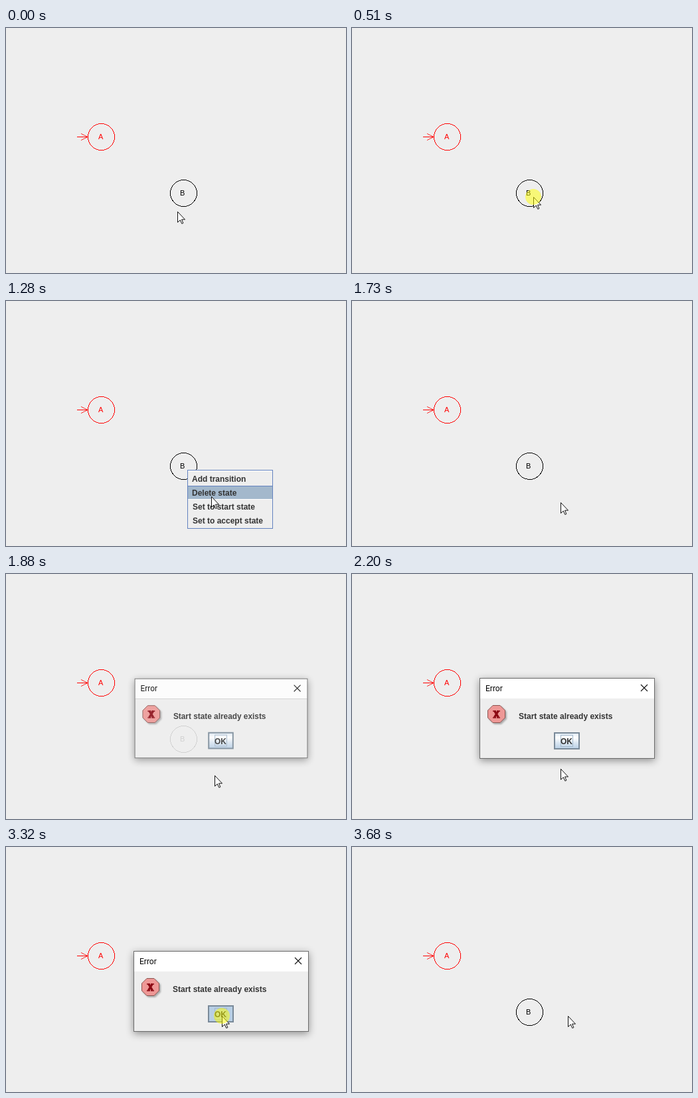
Recreate the animation shown at these times as an HTML page. Size 512 by 370 pixels, loop 3.75 s.

```html
<!DOCTYPE html>
<html lang="en">
<head>
<meta charset="utf-8">
<title>State diagram editor</title>
<style>
  html, body { margin: 0; width: 100%; height: 100%; overflow: hidden; background: #eee; }
  svg { display: block; }
  text { font: 11px "Liberation Sans", Arial, sans-serif; }
  .bold text { font-weight: bold; font-size: 12px; fill: #333; }
  .bold .title { font: 12px Roboto, "Open Sans", sans-serif; fill: #000; }
  .crisp { shape-rendering: crispEdges; }
  .frame { filter: drop-shadow(0 3px 6px rgba(0, 0, 0, .4)); }
  #dialog { transform-origin: 324px 218px; }
</style>
</head>
<body>
<svg width="512" height="370">
  <defs>
    <linearGradient id="metal" x2="0" y2="1">
      <stop stop-color="#dde8f3"/>
      <stop offset=".3" stop-color="#fff"/>
      <stop offset=".6" stop-color="#dde8f3"/>
      <stop offset="1" stop-color="#b8cfe5"/>
    </linearGradient>
  </defs>

  <g class="crisp" fill="none" stroke="red">
    <circle cx="143.5" cy="164.5" r="20"/>
    <path d="M107 164.5H123"/>
    <path d="M113 159.5L123.5 164.5L113 169.5" stroke-width=".8"/>
  </g>
  <text x="139" y="168" fill="red">A</text>
  <circle class="crisp" cx="267.5" cy="249.5" r="20" fill="none" stroke="#000"/>
  <text x="262" y="253">B</text>

  <g id="menu" class="bold">
    <rect x="273.5" y="255.5" width="128" height="88" fill="#eee" stroke="#6382bf"/>
    <path d="M274 256.5H401" stroke="#fff"/>
    <g id="armed">
      <rect x="274" width="127" height="21" fill="#a3b8cc"/>
      <path d="M274 .5H401" stroke="#6382bf"/>
      <path d="M274 20.5H401" stroke="#fff"/>
    </g>
    <text x="280" y="273">Add transition</text>
    <text x="280" y="294">Delete state</text>
    <text x="281" y="315">Set to start state</text>
    <text x="281" y="336">Set to accept state</text>
  </g>

  <g id="dialog" class="bold">
    <rect class="frame" x="192" y="157" width="264" height="122" fill="#6b6b6b"/>
    <rect x="193" y="158" width="262" height="30" fill="#fff"/>
    <rect x="193" y="188" width="262" height="90" fill="#eee"/>
    <text class="title" x="201" y="177">Error</text>
    <path d="M435 167l10 10m0-10l-10 10" stroke="#111" stroke-width="1.1"/>
    <g transform="translate(217.5 211.5)">
      <path id="stop" d="M-5.5-13h11l7.500 7.500v11l-7.500 7.500h-11l-7.500-7.500v-11z" fill="#ee9896" stroke="#8a5450"/>
      <path d="M-3-5l6 10m0-10l-6 10" stroke="#8c0a14" stroke-width="3.4"/>
      <path d="M-5.500-4.500h11m-11 10h11" stroke="#8c0a14" stroke-width="1.6" stroke-dasharray="5 1"/>
    </g>
    <text x="251" y="219">Start state already exists</text>
    <rect id="button" x="305" y="240" width="37" height="24" stroke="#7a8a99" stroke-width="2"/>
    <rect x="314.5" y="243.5" width="18" height="17" fill="none" stroke="#a3b8cc"/>
    <text x="314" y="257">OK</text>
  </g>

  <g id="pointer">
    <path d="M.5 .5v16l3.800-3.500 2.500 5.500 2.100-.9-2.400-5.400h5z"
          fill="#fff" stroke="#111" stroke-linejoin="round"/>
    <circle id="click" r="12" fill="#ff0" opacity=".5"/>
  </g>
</svg>
<style>#stop { filter: drop-shadow(2px 2px 1px #aaa); }</style>
<script>
const LOOP = 3750;
const [menu, armed, dialog, button, pointer, click] =
  ["menu", "armed", "dialog", "button", "pointer", "click"].map(id => document.getElementById(id));

// pointer moves: start, end, x, y reached; equal times make a jump
const home = [258, 277];
const moves = [
  [30, 110, 255, 271], [110, 260, 273, 255],
  [1020, 1020, 277, 258], [1020, 1280, 309, 295], [1280, 1420, 314, 304],
  [2200, 2200, 314, 294], [2200, 2300, 314, 289],
  [2450, 3010, 325, 255]
];

const clamp = v => Math.min(1, Math.max(0, v));
const within = (t, from, to) => t >= from && t < to;
const show = (node, on) => node.setAttribute("visibility", on ? "inherit" : "hidden");

function tipAt(t) {
  let [x, y] = home;
  for (const [from, to, toX, toY] of moves) {
    if (t < from) break;
    const p = to > from ? clamp((t - from) / (to - from)) : 1;
    x += (toX - x) * p;
    y += (toY - y) * p;
  }
  return [Math.round(x), Math.round(y)];
}

// dialog fades and grows in, then fades and shrinks out
function presence(t) {
  if (!within(t, 1780, 3680)) return 0;
  const opening = 1 - (1 - clamp((t - 1740) / 280)) ** 3;
  const closing = clamp((t - 3460) / 220);
  return t < 3500 ? opening : 1 - closing;
}

function draw(t) {
  const [x, y] = tipAt(t);
  const pressed = within(t, 3320, 3500);

  const open = within(t, 560, 1730);
  const row = Math.floor((y - 258) / 21);
  show(menu, open);
  show(armed, open && row >= 0);
  armed.setAttribute("transform", `translate(0 ${258 + 21 * row})`);

  const p = presence(t);
  show(dialog, p > 0);
  dialog.style.opacity = p;
  dialog.style.transform = p < 1 ? `scale(${0.9 + 0.1 * p})` : "none";
  button.setAttribute("fill", pressed ? "#b8cfe5" : "url(#metal)");

  pointer.setAttribute("transform", `translate(${x} ${y})`);
  show(click, pressed || within(t, 410, 560) || within(t, 1600, 1730));
}

const start = performance.now();
function tick() {
  draw((performance.now() - start) % LOOP);
  requestAnimationFrame(tick);
}
tick();
</script>
</body>
</html>
```
